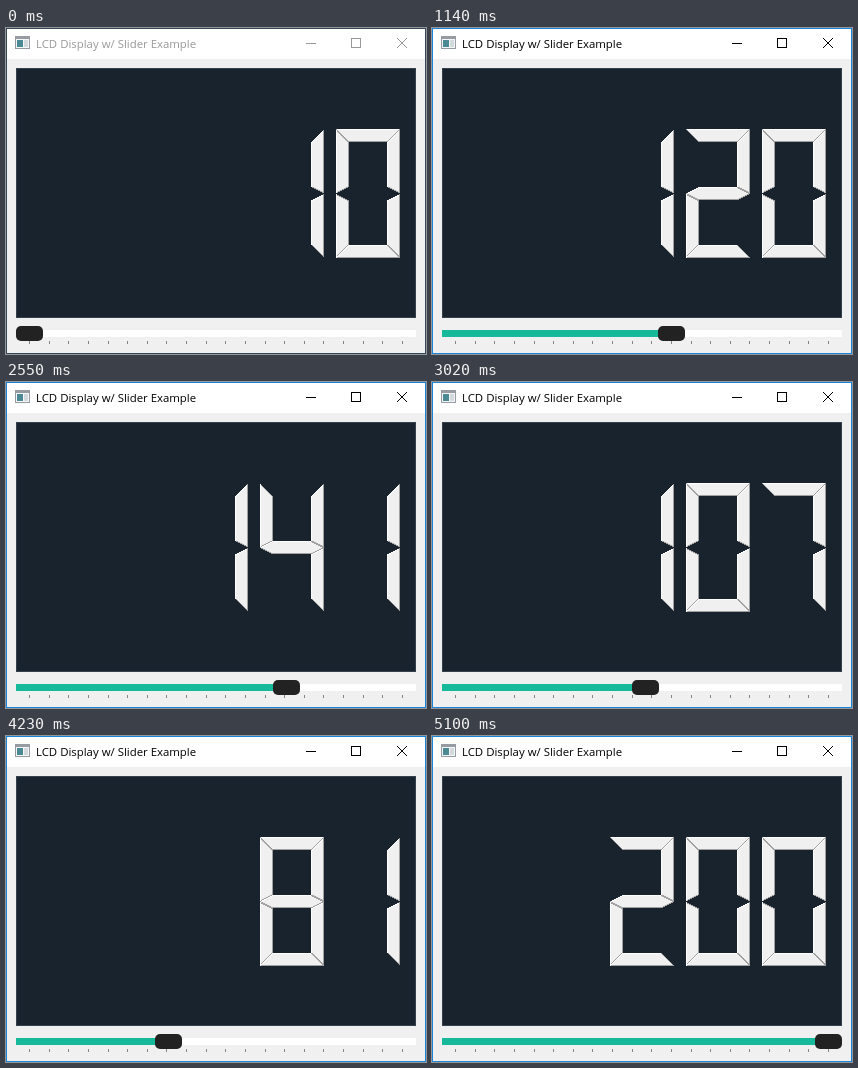
Animation of 420x326 px, one loop 5.25 s. Source, as an HTML page with a canvas:

```html
<!DOCTYPE html>
<html>
<head>
<meta charset="utf-8">
<style>
  html, body { margin: 0; width: 100%; height: 100%; overflow: hidden; }
  canvas { display: block; }
</style>
</head>
<body>
<canvas id="stage" width="420" height="326"></canvas>
<script>
const ctx = document.getElementById('stage').getContext('2d');
const LOOP = 5250, TICK = 30, ACTIVATE = 20;

// Slider drag as a few [time, value] points, joined by a monotone curve
const keys = [
  [0, 10], [540, 40], [1140, 120], [1500, 142], [2520, 142], [2550, 141],
  [3030, 107], [3090, 107], [3540, 71], [4080, 71], [4650, 151], [5100, 200],
  [LOOP, 200]
];

// Segment geometry: three outlines, clockwise, and their mirror images
const LEN = 64, THICK = 12, HALF = THICK / 2, END = LEN - 1;
const flipX = shape => shape.map(([x, y]) => [END - x, y]).reverse();
const flipY = shape => shape.map(([x, y]) => [x, 2 * LEN - y]).reverse();
const bar = [[0, 0], [END, 0], [END - THICK, THICK], [THICK, THICK]];
const post = [[0, 1], [THICK, THICK + 1], [THICK, END - HALF], [0, END]];
const middle = [[0, LEN], [THICK, LEN - HALF], [END - THICK, LEN - HALF],
                [END, LEN], [END - THICK, LEN + HALF], [THICK, LEN + HALF]];
const segments = [bar, post, flipX(post), middle,
                  flipY(post), flipX(flipY(post)), flipY(bar)];
const digits = ['012456', '25', '02346', '02356', '1235',
                '01356', '013456', '025', '0123456', '012356'];

function rect(x, y, w, h, color) {
  ctx.fillStyle = color;
  ctx.fillRect(x, y, w, h);
}

// Crisp line without antialiasing
function line(x, y, dx, dy, color) {
  const n = Math.max(Math.abs(dx), Math.abs(dy));
  for (let i = 0; i <= n; i++) {
    rect(Math.round(x + dx * i / n), Math.round(y + dy * i / n), 1, 1, color);
  }
}

function rate(i) {
  const a = keys[i], b = keys[i + 1];
  return a && b ? (b[1] - a[1]) / (b[0] - a[0]) : 0;
}

// Harmonic mean of neighbouring rates keeps the curve monotone
function slope(i) {
  const a = rate(i - 1), b = rate(i);
  return a * b > 0 ? 2 * a * b / (a + b) : 0;
}

function valueAt(time) {
  const t = Math.floor(time / TICK) * TICK;
  const i = keys.findIndex((k, n) => t < keys[n + 1][0]);
  const [t0, v0] = keys[i], [t1, v1] = keys[i + 1];
  const span = t1 - t0, u = (t - t0) / span, w = 1 - u;
  return Math.round(v0 * w * w * (1 + 2 * u) + v1 * u * u * (3 - 2 * u)
    + span * u * w * (slope(i) * w - slope(i + 1) * u));
}

function drawSegment(shape, left, top) {
  ctx.fillStyle = '#f0f0f0';
  ctx.beginPath();
  for (const [x, y] of shape) ctx.lineTo(left + x + 0.5, top + y + 0.5);
  ctx.fill();
  shape.forEach(([x, y], i) => {
    const [nx, ny] = shape[(i + 1) % shape.length];
    const dx = nx - x, dy = ny - y;
    // Edges facing up and left catch the light
    line(left + x, top + y, dx, dy, dx >= 0 && dy <= 0 ? '#ffffff' : '#a0a0a0');
  });
}

function drawNumber(value) {
  rect(10, 40, 400, 250, '#32414b');
  rect(11, 41, 398, 248, '#19232d');
  [...String(value)].reverse().forEach((d, place) => {
    for (const s of digits[d]) drawSegment(segments[s], 330 - 76 * place, 101);
  });
}

function drawWindow(active) {
  const ink = active ? '#000000' : '#999999';
  rect(0, 0, 420, 326, active ? '#1883d7' : '#34465a');
  rect(1, 1, 418, 324, '#f0f0f0');
  rect(1, 1, 418, 30, '#ffffff');

  rect(9, 8, 15, 13, '#969ca1');
  rect(10, 11, 13, 9, '#f4f6f7');
  rect(11, 12, 6, 7, '#4b8a94');
  rect(18, 12, 4, 7, '#d3dade');

  ctx.fillStyle = ink;
  ctx.font = '11.4px "Open Sans", "Noto Sans", sans-serif';
  ctx.fillText('LCD Display w/ Slider Example', 30, 20);

  rect(300, 15, 10, 1, ink);
  ctx.strokeStyle = ink;
  ctx.strokeRect(345.5, 10.5, 9, 9);
  line(391, 10, 9, 9, ink);
  line(391, 19, 9, -9, ink);
}

function drawSlider(value) {
  const x = Math.round(10 + (value - 10) / 190 * 373);
  rect(10, 302, 400, 7, '#ffffff');
  rect(10, 302, x - 6, 7, '#16b99a');
  for (let i = 0; i < 20; i++) rect(Math.round(23 + i * 373 / 19), 313, 1, 3, '#858585');
  ctx.fillStyle = '#222222';
  ctx.beginPath();
  ctx.roundRect(x, 298, 27, 15, 5);
  ctx.fill();
}

function frame() {
  const t = performance.now() % LOOP;
  const value = valueAt(t);
  drawWindow(t >= ACTIVATE);
  drawNumber(value);
  drawSlider(value);
  requestAnimationFrame(frame);
}
frame();
</script>
</body>
</html>
```
